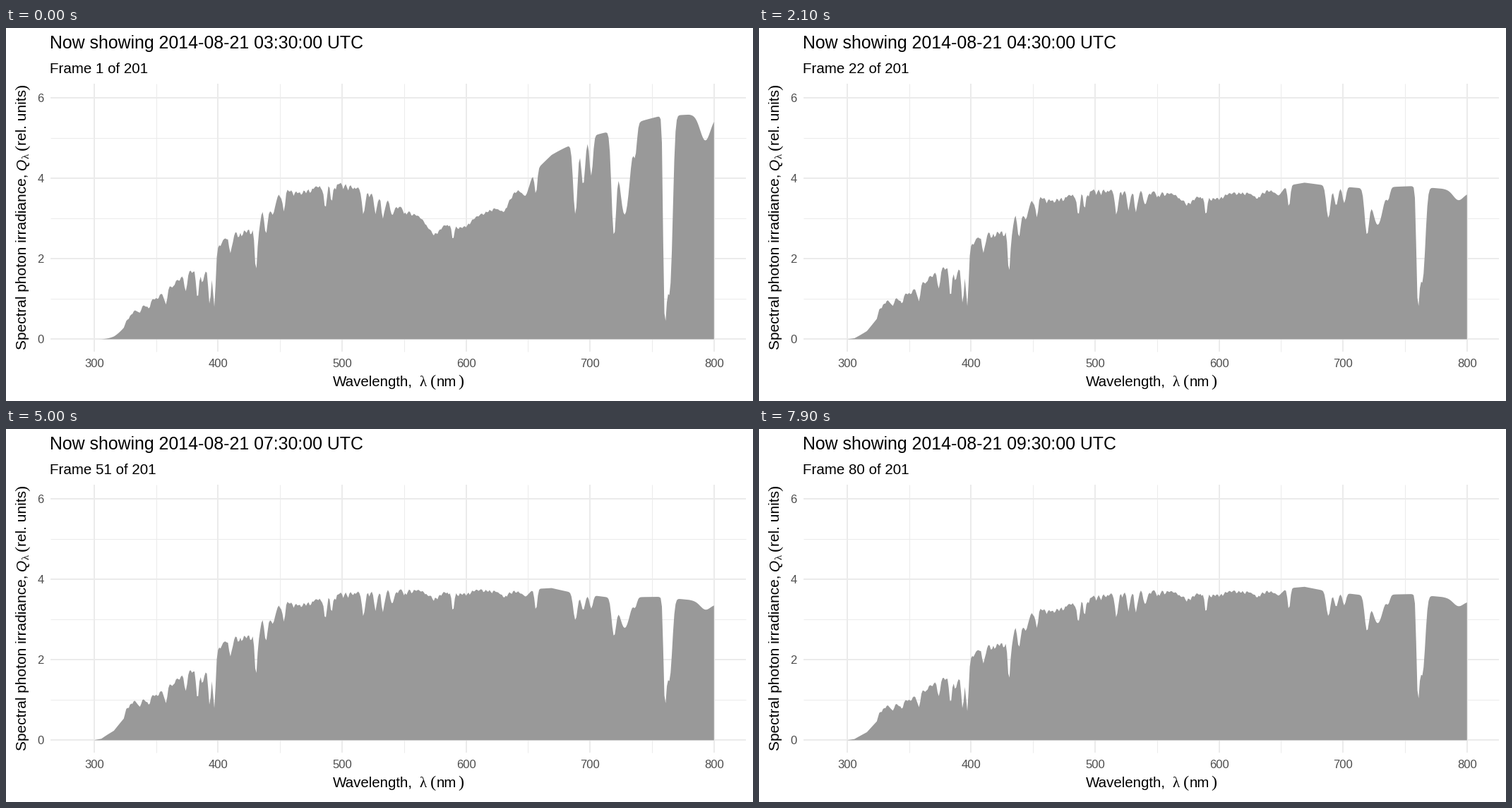
Write a matplotlib script that moves like this. It is 1058 px wide and 529 px high and loops after 8000 ms.

```python
import numpy as np
import matplotlib.pyplot as plt
from matplotlib.animation import FuncAnimation

W, H, DPI = 1058, 529, 100
FRAMES, INTERVAL = 80, 100
SANS, SERIF = "Liberation Sans", "Liberation Serif"
GRID, FILL, TICK = "#EBEBEB", "#999999", "#4D4D4D"

nm = np.arange(300, 801)


def bump(centre, width):
    return np.exp(-((nm - centre) / width) ** 2 / 2)


# Sunlight: a smooth envelope cut by strong lines and random weak ones
ENVELOPE = {300: 0, 306: .03, 316: .21, 324: .5, 326: .73, 330: .92, 340: .98,
            354: 1.18, 366: 1.47, 378: 1.7, 391: 1.73, 397: 1.9, 399: 2.22,
            409: 2.5, 432: 2.62, 436: 2.97, 443: 2.94, 451: 3.45, 466: 3.36,
            495: 3.66, 531: 3.73, 583: 3.68, 642: 3.74, 669: 3.83, 685: 3.74,
            715: 3.64, 755: 3.67, 780: 3.6, 800: 3.5}
STRONG = {336.5: .14, 344: .15, 358: .29, 374: .24, 383.6: .4, 387.5: .19,
          393.3: .53, 397: .57, 410.2: .15, 430.6: .37, 438.7: .17, 453: .14,
          486.4: .15, 491.7: .1, 517.2: .17, 527: .14, 533: .14, 540.6: .09,
          589.6: .12, 656.4: .14}

rng = np.random.default_rng(4)
sun = np.interp(nm, list(ENVELOPE), list(ENVELOPE.values()))
for centre, depth in STRONG.items():
    sun *= 1 - depth * bump(centre, 1.05)
for centre in np.arange(328, 650, 3.4):
    depth = .02 + .07 * (650 - centre) / 320
    sun *= 1 - depth * rng.uniform(.2, 1) * bump(centre + rng.uniform(-1, 1), .75)

# Absorption by water and oxygen: centre, width, optical depth
WATER = [(574, 5, .05), (597, 5, .025), (630, 4, .035), (648, 3, .045),
         (688.2, 1.6, .21), (694.5, 1.5, .12), (701, 1.3, .1),
         (719.3, 1.7, .31), (728, 3.8, .25), (736.5, 1.3, .06), (793, 4, .055)]
OXYGEN = [(760.5, 1, 1.15), (763.8, 2.1, .9)]
water, oxygen = (sum(d * bump(c, w) for c, w, d in bands)
                 for bands in (WATER, OXYGEN))

# A low sun is redder and loses more to ozone
reddening = (.08 + .32 * (nm - 450) / 350 - .41 * bump(592, 50)
             - 4 * np.exp((300 - nm) / 11))
blueness = np.clip((530 - nm) / 150, 0, 1)


def spectrum(red, blue, mass):
    gas = mass * water + mass ** .77 * oxygen
    return sun * np.exp(red * reddening + blue * blueness - gas)


# The second and third hours follow from the halfway mixes around them
first = spectrum(1.15, 0, 2.15)
second = 2 * spectrum(.66, .07, 1.68) - first
third = 2 * spectrum(.1, .06, 1.13) - second
states = [first, second, third,
          spectrum(0, 0, 1),
          spectrum(-.1, .04, .96),
          spectrum(-.04, -.03, .94),
          spectrum(-.03, -.08, .87)]
states = [np.maximum(s, 0) for s in states]

HOLD, PERIOD, MOVE = 6, 13.4, 6


def pose(n):
    """Spectrum and hour index for the 1-based frame count n."""
    for k in range(len(states) - 1):
        t = (n - HOLD - round(PERIOD * k)) / MOVE
        if t < 1:
            t = max(t, 0)
            mix = states[k] + t * (states[k + 1] - states[k])
            return mix, k + (t > .5)
    return states[-1], len(states) - 1


def px(wavelength):
    return 124.7 + 1.7561 * (wavelength - 300)


def py(value):
    return 441.4 - 57.08 * value


fig = plt.figure(figsize=(W / DPI, H / DPI), dpi=DPI, facecolor="white")
ax = fig.add_axes([0, 0, 1, 1])
ax.set_xlim(0, W)
ax.set_ylim(H, 0)
ax.axis("off")


def text(x, y, s, size=15, color="black", font=SANS, **kw):
    kw = {"ha": "left", "va": "baseline", **kw}
    return ax.text(x, y, s, fontsize=size, color=color, family=font, **kw)


def up(x, y, s, size=15, **kw):
    return text(x, y, s, size, rotation=90, rotation_mode="anchor", **kw)


LEFT, RIGHT, TOP, BOTTOM = 62.5, 1047.5, 79, 459


def rule(x, y, major):
    ax.plot(x, y, color=GRID, lw=1.44 if major else .72,
            solid_capstyle="butt", zorder=1)


for w in range(300, 801, 50):
    major = w % 100 == 0
    rule([px(w)] * 2, [TOP, BOTTOM], major)
    if major:
        text(px(w), 481, str(w), 12, TICK, ha="center")
for v in range(7):
    major = v % 2 == 0
    rule([LEFT, RIGHT], [py(v)] * 2, major)
    if major:
        text(53.5, py(v) + 6, str(v), 12, TICK, ha="right")

text(462.5, 508, "Wavelength,", 14.8)
text(585, 508, "λ", font=SERIF)
text(601, 508, "(", 17.5, font=SERIF)
text(609.5, 508, "nm", 14.8)
text(640, 508, ")", 17.5, font=SERIF)

up(29, 456.5, "Spectral photon irradiance,")
up(29, 201, "Q", style="italic")
up(33, 185, "λ", 10.5, font=SERIF)
up(29, 173, "(", 17.5, font=SERIF)
up(29, 165.5, "rel. units")
up(29, 88, ")", 17.5, font=SERIF)

title = text(62, 29, "", 17.93)
subtitle = text(62, 64, "", 14.75)
xs = np.concatenate([px(nm), [px(800), px(300)]])
area, = ax.fill(xs, np.full(len(xs), py(0)), color=FILL, lw=0, zorder=2)


def draw(i):
    values, hour = pose(i + 1)
    ys = np.concatenate([py(values), [py(0)] * 2])
    area.set_xy(np.column_stack([xs, ys]))
    title.set_text(f"Now showing 2014-08-21 {3 + hour:02d}:30:00 UTC")
    subtitle.set_text(f"Frame {i + 1} of 201")
    return area, title, subtitle


anim = FuncAnimation(fig, draw, frames=FRAMES, interval=INTERVAL,
                     init_func=lambda: draw(0), repeat=True, repeat_delay=0)
plt.show()
```
